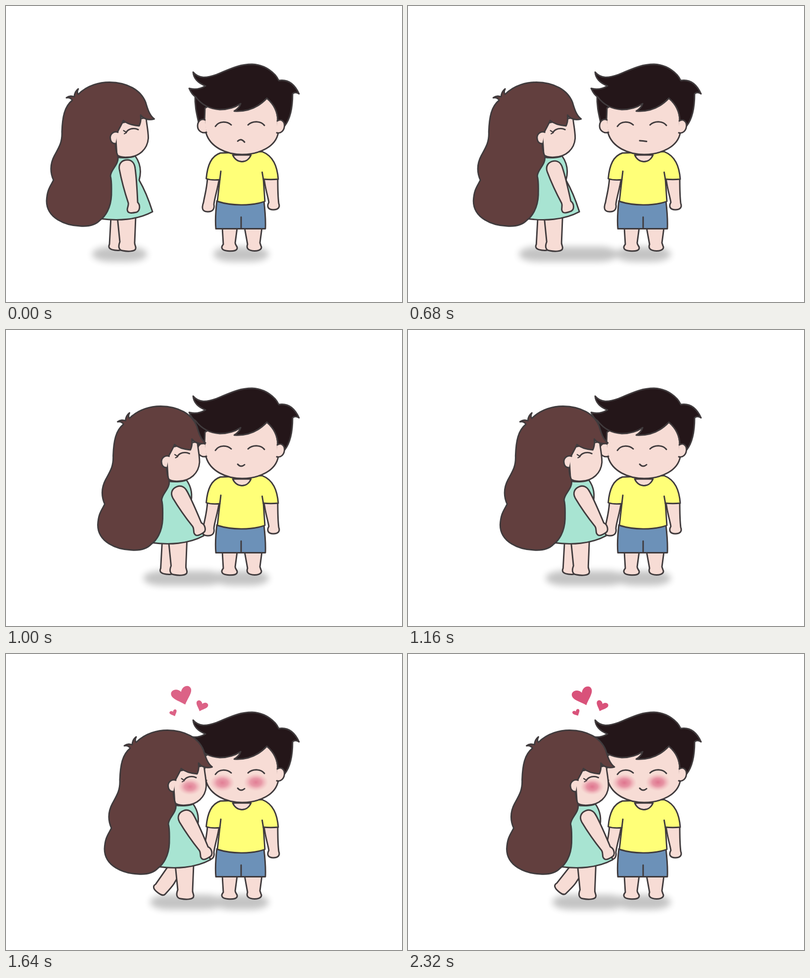
Write an HTML page that moves like this. It is 800x600 px and loops after 3.32 s.

```html
<!DOCTYPE html>
<html lang="en">
<head>
<meta charset="utf-8">
<title>A kiss on the cheek</title>
<style>
  html, body { margin: 0; width: 100%; height: 100%; overflow: hidden; background: #fff; }
  svg { display: block; width: 100%; height: 100%; }
  .art path { stroke: #403b3d; stroke-width: 2.9; stroke-linecap: round; stroke-linejoin: round; }
  .art .thin { stroke-width: 2.2; }
  .skin { fill: #f7dcd5; }
  .line { fill: none; }
  .girlHair { fill: #623f3e; }
  .boyHair { fill: #241619; }
  .dress { fill: #a8e4d2; }
  .shirt { fill: #ffff78; }
  .shorts { fill: #6c91b8; }
  .blush { fill: url(#glow); }
</style>
</head>
<body>
<svg viewBox="0 0 800 600">
  <defs>
    <radialGradient id="glow">
      <stop offset="0" stop-color="#d8577a" stop-opacity=".78"/>
      <stop offset=".45" stop-color="#dc6483" stop-opacity=".6"/>
      <stop offset="1" stop-color="#ee9aa8" stop-opacity="0"/>
    </radialGradient>
    <filter id="soft" filterUnits="userSpaceOnUse" x="100" y="450" width="500" height="110">
      <feGaussianBlur stdDeviation="7"/>
    </filter>
    <path id="heart" d="M0 20C-8 10-21 2-21-7C-21-17-6-19 0-7C6-19 21-17 21-7C21 2 8 10 0 20Z"/>
  </defs>

  <g filter="url(#soft)" opacity=".23">
    <rect id="girlShadow" y="488" height="30" rx="36" ry="15"/>
    <rect x="419" y="488" width="112" height="30" rx="36" ry="15"/>
  </g>

  <g class="art">
    <!-- boy -->
    <path class="skin" d="M437 450L439 483C433 490 436 495.500 448 496.500C460 497.500 468 496 467 489C466 486 463 484 463 480L467 450Z"/>
    <path class="skin" d="M482 450L488 483C485 491 489 496 502 496.500C514 496.500 518 491 515 486L513 480L517 450Z"/>
    <path class="skin" d="M407 348C406 370 401 385 399 398C394 412 398 416.500 407 417C416 417.500 422 413 420 402C421 390 428 370 431 348Z"/>
    <path class="skin" d="M521 348C524 372 529 385 531 398C526 407 530 413 540 413C550 413 554 408 551 400C549 385 549 365 549 348Z"/>
    <path class="shorts" d="M426 395C424 412 422 430 424 451.500H524C525 430 523 412 521 395Z"/>
    <path class="line" d="M475 428V451"/>
    <path class="shirt" d="M433 298C415 304 407 322 404.500 350C413 353 423 353 432 352L427 396C455 405 495 406 523 396L520 351C530 352 540 352 550 351C548 325 540 304 517 295Z"/>
    <path class="line" d="M434 335L432 352M517.500 337L520 352"/>
    <path class="skin" d="M458 302C465 319 487 321 495 302Z"/>
    <path class="boyHair" d="M382 180C381 205 386 222 390 240H410V190Z"/>
    <path class="skin" d="M402 207L401 234C401 243 402 250 404 257C412 286 445 301 477 301C513 300.500 545 285 550 257L549 233C549 212 540 198 527 187L430 190Z"/>
    <path class="boyHair" d="M378 134C390 148 405 146 425 139C452 128 470 118 497 118C525 119 545 137 551 151C570 148 583 158 592 178C587 175 582 175 579 178C579 205 575 228 563 243L549 233C549 212 540 198 527 187C512 203 490 215 461 213C468 209 472 204 474 198C462 206 450 210 432 210C412 209 395 200 383 184C377 181 373 174 370 167C381 170 393 168 403 162C390 157 379 148 378 134Z"/>
    <path class="skin" d="M402 231C394 227 387 234 387 243C387 253 396 259 405 256"/>
    <path class="skin" d="M548 233C556 228 563 234 562.500 243C562 253 555 259 547 257"/>
    <path class="line" d="M423 244C430 233 446 233 455 241M489 241C497 233 514 232 522 242"/>
    <path class="line" id="mouth"/>
    <g class="cheeks">
      <ellipse class="blush" cx="437" cy="261" rx="25" ry="18"/>
      <ellipse class="blush" cx="505" cy="260" rx="25" ry="18"/>
    </g>

    <!-- girl -->
    <g id="girl">
      <path id="backLeg" class="skin" d="M212 428L209 483C205 491 212 494 220 495C228 496 235 496 236 490C238 480 240 470 240 462L239 428Z"/>
      <path class="skin" d="M225 428L230 478C226 488 228 495 236 496C246 498 262 498 262 491C263 487 259 484 260 478L262 428Z"/>
      <path class="dress" d="M222 306C240 309 255 307 261 304C271 318 274 335 269 353C280 372 290 398 296 417C265 434 225 436 190 431V400L215 320Z"/>
      <path id="arm" class="skin" d="M229 331C227 319 235 312 245 312C255 312 260 320 261 330C263 345 265 375 266 398C272 404 271 418 261 418.500C253 420 245 421 245 412C246 406 248 403 247 399C240 378 233 352 229 331Z"/>
      <path class="skin" d="M283 226C284 240 287.500 252 287.500 268C286 290 269 306 245 306.500C236 307 229 306 224 302L220 240Z"/>
      <path class="girlHair" d="M146 179C165 160 190 154.500 209 154.500C245 155 272 170 282 195C286 209 290 222 299.500 229C288 232 279 230 272 221C273 230 272 237 269 243C256 242 245 239 237 232C233 242 228 249 225 256L217 262V275L221 280C221 289 223 297 226 304C229 322 211 331 211 345C214 356 213 368 213 383C212 410 200 427 190 434C180 445 165 447 150 446C120 445 82 430 82 395C83 372 90 365 96 353C88 335 90 318 98 303C108 285 114 275 113 255C114 225 118 204 134 191C131 186 127 185 122 186C129 181 134 183 138 184C138 177 141 172 146 168C143 174 144 177 146 179Z"/>
      <path class="skin" d="M226 256C218 253 210.500 259 210.500 267C211 276 215 279 221 279"/>
      <path class="line" d="M243 256C247 249 258 246 267 250.500"/>
      <path class="line thin" d="M243 256L237.500 252.500M243 257L239 259"/>
      <g class="cheeks"><ellipse class="blush" cx="254.500" cy="269" rx="24" ry="17"/></g>
    </g>
  </g>

  <g id="hearts" fill="#d9527a">
    <use href="#heart"/><use href="#heart"/><use href="#heart"/>
  </g>
</svg>

<script>
const LOOP = 3320, STEP = 40;
const byId = id => document.getElementById(id);
const set = (el, attrs) => { for (const k in attrs) el.setAttribute(k, attrs[k]); };
const mix = (a, b, k) => a + (b - a) * k;

// Sine ease in and out between two moments
const ease = (t, from, to) =>
  (1 - Math.cos(Math.PI * Math.min(1, Math.max(0, (t - from) / (to - from))))) / 2;

// Start and end pose: x, y, angle; then scale
const hearts = [
  { a: [378.5, 69.5, 0], b: [353.5, 85, -20], size: 1 },
  { a: [430.5, 105.5, 8], b: [391.5, 105, 22], size: .58 },
  { a: [320, 126, 10], b: [340.3, 118.7, -27], size: .36 }
];

function draw(t) {
  const walk = ease(t, 420, 950);
  const lean = ease(t, 1060, 1720);
  const love = ease(t, 1320, 1720);
  const dx = 103.5 * walk + 14 * lean;

  set(byId('girl'), { transform: `translate(${dx} 0)` });
  set(byId('arm'), { transform: `translate(${2.5 * walk} ${4 * walk}) rotate(${-20 * walk} 246 328)` });
  set(byId('backLeg'), { transform: `rotate(${35 * love} 226 433)` });

  const left = 174 + dx;
  const right = 285 + 155 * Math.min(1, walk * 1.9) ** 1.3;
  set(byId('girlShadow'), { x: left, width: right - left });

  const y = (a, b) => mix(a, b, walk);
  set(byId('mouth'), { d: `M468 ${y(274, 272)}Q474.5 ${y(267, 279.5)} 482 ${y(276, 273)}` });

  document.querySelectorAll('.cheeks').forEach(c => set(c, { opacity: love }));
  set(byId('hearts'), { opacity: love });
  hearts.forEach(({ a, b, size }, i) => {
    const [hx, hy, angle] = a.map((v, j) => mix(v, b[j], love));
    set(byId('hearts').children[i], {
      transform: `translate(${hx} ${hy}) rotate(${angle}) scale(${size})`
    });
  });
}

const start = performance.now();
function frame() {
  const t = (performance.now() - start) % LOOP;
  draw(Math.floor(t / STEP) * STEP);
  requestAnimationFrame(frame);
}
frame();
</script>
</body>
</html>
```
